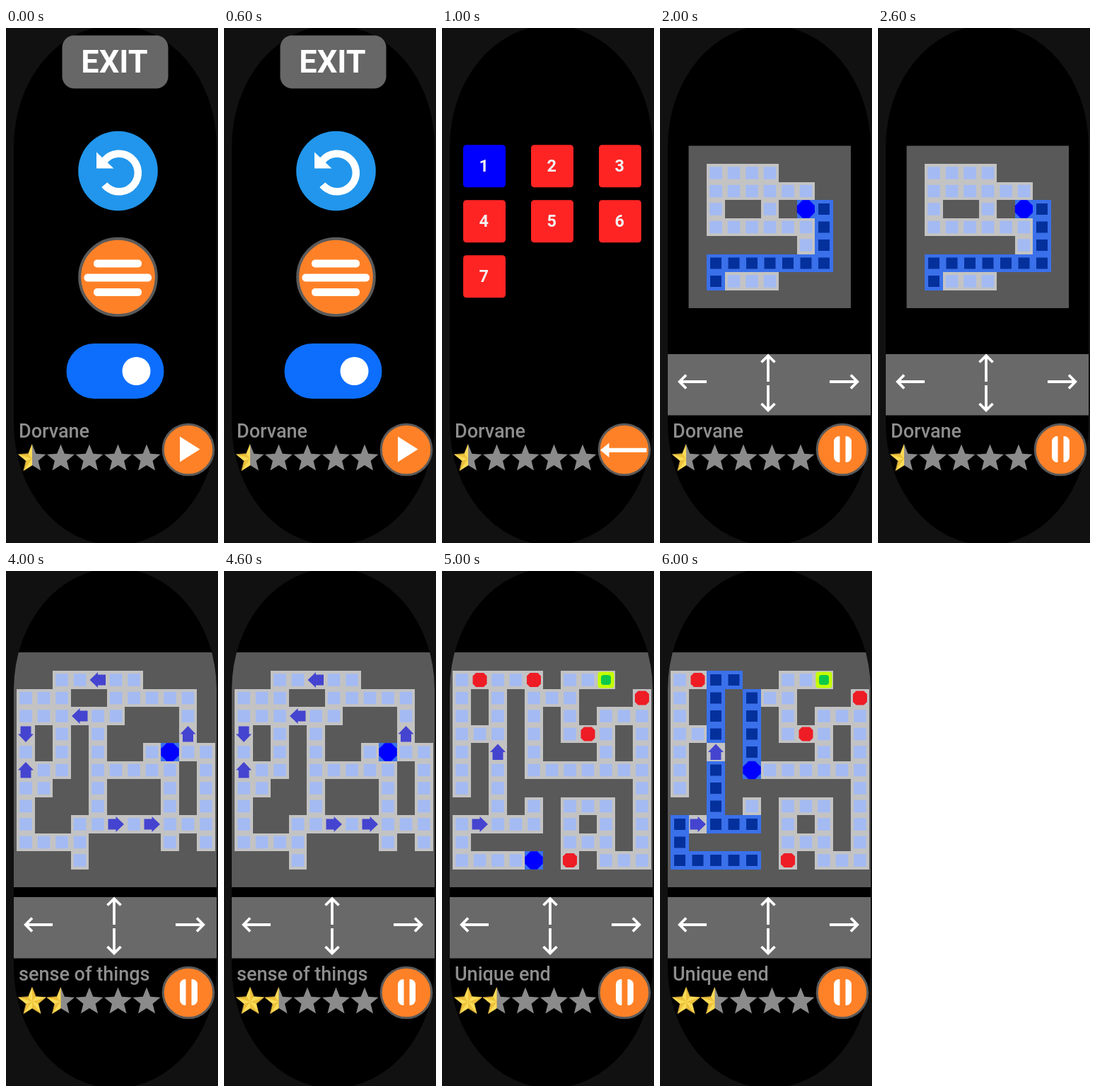
An HTML page with a canvas for the animation above (7 s loop, 300x728 px).

```html
<!DOCTYPE html>
<html lang="en">
<head>
<meta charset="utf-8">
<style>
  html, body { margin: 0; width: 100%; height: 100%; overflow: hidden; background: #111; }
  canvas { display: block; }
</style>
</head>
<body>
<canvas id="stage" width="300" height="728"></canvas>
<script>
const ctx = document.getElementById('stage').getContext('2d');
const PITCH = 25.5, LEFT = 15.25, TOP = 141.25;
const ORANGE = '#ff8127', FONT = 'Roboto, sans-serif';

const oval = new Path2D();
oval.roundRect(11, -4, 287, 735, { x: 143.5, y: 171 });

// o path, t visited, P player, R trap, G goal, <>^v one-way cells
const LOOP = `


..oooo
..oooooo
..o..o.Pt
..oooooot
.......ot
..ttttttt
..tooo`.slice(1);
const RISE = `
..........o
.ooooooo>oo
.oooo..o..o
...oo..oP.o
..oo..ooo.o
..o..ooo..o
.ooooo...oo
..oo....oo^
o....oooo.o
oooooo.oooo
.ooooooo`.slice(1);
const ONE_WAY = `
..oo<oo
ooo..ooooo
ooo<oo...o
v.o.o....^
o.o.o..oPoo
^oo.ooooo.o
oo..o...o.o
o...o...o.o
o..oo>o>ooo
oooo....o.o
...o`.slice(1);
const END_START = `
oRooR.ooG
o.o.ooo...R
o.o.o.o.ooo
ooo.o.oRo.o
o.^.o...o.o
o.o.ooooooo
o.o.......o
..o.o.ooo.o
o>ooo.o.o.o
o.....ooo.o
ooooP.R.ooo`.slice(1);
const END_LATER = `
oRtt..ooG
o.t.too...R
o.t.t.o.ooo
oot.t.oRo.o
o.^.t...o.o
o.t.Poooooo
o.t.......o
..t.o.ooo.o
t>ttt.o.o.o
t.....ooo.o
ttttt.R.ooo`.slice(1);

function poly(color, ...points) {
  ctx.fillStyle = color;
  ctx.beginPath();
  for (const [x, y] of points) ctx.lineTo(x, y);
  ctx.closePath();
  ctx.fill();
}

function box(color, x, y, w, h, radius = 0) {
  ctx.fillStyle = color;
  ctx.beginPath();
  ctx.roundRect(x, y, w, h, radius);
  ctx.fill();
}

function disc(color, x, y, r, border) {
  ctx.fillStyle = color;
  ctx.beginPath();
  ctx.arc(x, y, r, 0, 7);
  ctx.fill();
  if (border) {
    ctx.strokeStyle = '#5a5a5a';
    ctx.lineWidth = border;
    ctx.stroke();
  }
}

function text(str, x, y, size, color, weight = 500, align = 'center') {
  ctx.font = `${weight} ${size}px ${FONT}`;
  ctx.textAlign = align;
  ctx.fillStyle = color;
  ctx.fillText(str, x, y);
}

function placed(x, y, angle, paint) {
  ctx.save();
  ctx.translate(x, y);
  ctx.rotate(angle);
  paint();
  ctx.restore();
}

function octagon(color, x, y, r, cut) {
  const s = r - cut;
  poly(color, [x - s, y - r], [x + s, y - r], [x + r, y - s], [x + r, y + s],
    [x + s, y + r], [x - s, y + r], [x - r, y + s], [x - r, y - s]);
}

function cell(kind, col, row) {
  const x = LEFT + (col + .5) * PITCH, y = TOP + (row + .5) * PITCH;
  const x0 = Math.round(x - PITCH / 2), y0 = Math.round(y - PITCH / 2);
  const x1 = Math.round(x + PITCH / 2), y1 = Math.round(y + PITCH / 2);
  const square = (color, size, r) => box(color, x - size / 2, y - size / 2, size, size, r);
  box('tP'.includes(kind) ? '#3a70ea' : '#c3c3c3', x0, y0, x1 - x0, y1 - y0);
  if (kind === 'o') square('#a3baf3', 17.5);
  else if (kind === 't') square('#04309c', 16);
  else if (kind === 'P') octagon('#0000ff', x, y, 12.7, 8);
  else if (kind === 'R') octagon('#ee1c25', x, y, 10, 4.5);
  else if (kind === 'G') {
    square('#c4ff00', 23, 4);
    square('#0cc94a', 14, 4);
  } else {
    placed(x, y, '>v<^'.indexOf(kind) * Math.PI / 2, () =>
      poly('#4444d0', [-11, -7.5], [0, -7.5], [0, -11], [11.5, 0], [0, 11], [0, 7.5], [-11, 7.5]));
  }
}

function maze(map) {
  map.split('\n').forEach((line, row) =>
    [...line].forEach((kind, col) => kind !== '.' && cell(kind, col, row)));
}

function moveArrow(x, y, angle, length) {
  placed(x, y, angle, () => {
    ctx.strokeStyle = '#fff';
    ctx.lineWidth = 3.8;
    ctx.beginPath();
    ctx.moveTo(-length, 0);
    ctx.lineTo(-3, 0);
    ctx.moveTo(-12, -9.5);
    ctx.lineTo(-2.7, 0);
    ctx.lineTo(-12, 9.5);
    ctx.stroke();
  });
}

function controls() {
  box('#696969', 11, 461, 287, 86.5);
  moveArrow(25, 500, Math.PI, 41);
  moveArrow(282, 500, 0, 42);
  moveArrow(153, 460.5, -Math.PI / 2, 39.5);
  moveArrow(153, 543, Math.PI / 2, 38);
}

function star(x, y, color) {
  const points = Array.from({ length: 10 }, (_, i) => {
    const r = i % 2 ? 9 : 20.5, a = i * Math.PI / 5 - Math.PI / 2;
    return [x + r * Math.cos(a), y + r * Math.sin(a)];
  });
  if (color) return poly(color, ...points);
  poly('#eec23a', ...points);
  ctx.strokeStyle = '#b08c30';
  ctx.lineWidth = 1;
  ctx.stroke();
  points.forEach((p, i) => i % 2 && poly('#fadc58', [x, y], p, points[(i + 1) % 10]));
}

function rating(score) {
  for (let i = 0; i < 5; i++) {
    const x = 37 + 40.5 * i;
    star(x, 609, '#8b8b8b');
    const filled = Math.min(1, score - i);
    if (filled <= 0) continue;
    ctx.save();
    ctx.beginPath();
    ctx.rect(x - 21, 585, 42 * filled, 45);
    ctx.clip();
    star(x, 609);
    ctx.restore();
  }
}

const icons = {
  play() { poly('#fff', [246, 577.5], [246, 613.5], [274.5, 595.5]); },
  back() {
    box('#fff', 233, 593.7, 56.5, 6);
    poly('#fff', [224, 596.7], [236.5, 586.5], [236.5, 607]);
  },
  pause() {
    box('#fff', 246, 577, 8.5, 37, [8, 1, 1, 8]);
    box('#fff', 262.5, 577, 8.5, 37, [1, 8, 8, 1]);
  }
};

function menu() {
  box('#676767', 79.5, 10.5, 150, 75, 17);
  text('EXIT', 153.5, 62.5, 45, '#fff', 700);

  disc('#2196ec', 158.5, 202, 56.3);
  ctx.strokeStyle = '#fff';
  ctx.lineWidth = 10.5;
  ctx.beginPath();
  ctx.arc(160, 204.5, 26.8, Math.PI * 1.22, Math.PI * 2.78);
  ctx.stroke();
  poly('#fff', [128, 175.5], [128, 198.5], [152.5, 198.5]);

  disc(ORANGE, 158.5, 352, 54.3, 4);
  box('#fff', 124, 327.5, 68, 11, 5);
  box('#fff', 110.5, 347.5, 95.5, 11, 5);
  box('#fff', 124, 368, 68, 11, 5);

  box('#0d6efd', 85.5, 446, 138, 78, 39);
  disc('#fff', 184.5, 485, 20);
}

function levels() {
  for (let i = 0; i < 7; i++) {
    const x = 30 + 96 * (i % 3), y = 165.3 + 78 * Math.floor(i / 3);
    box(i ? '#ff2424' : '#0000ff', x, y, 60, 60, 4.5);
    text(i + 1, x + 29.3, y + 37.3, 23.5, '#f2f2f2', 700);
  }
}

function play(map, wide = true) {
  ctx.save();
  ctx.clip(oval);
  if (wide) box('#595959', 11, 115, 287, 332);
  else box('#595959', 40.5, 166.5, 229.5, 229.5);
  maze(map);
  controls();
  ctx.restore();
}

const scenes = [
  ['Dorvane', .5, 'play', menu],
  ['Dorvane', .5, 'back', levels],
  ['Dorvane', .5, 'pause', () => play(LOOP, false)],
  ['Increasing', 1, 'pause', () => play(RISE)],
  ['sense of things', 1.5, 'pause', () => play(ONE_WAY)],
  ['Unique end', 1.5, 'pause', () => play(END_START)],
  ['Unique end', 1.5, 'pause', () => play(END_LATER)]
];

function render(now) {
  const [title, score, icon, content] = scenes[Math.floor(now / 1000) % scenes.length];
  box('#111', 0, 0, 300, 728);
  ctx.fillStyle = '#000';
  ctx.fill(oval);
  content();
  text(title, 18, 579, 27, '#8e8e8e', 500, 'left');
  rating(score);
  disc(ORANGE, 258, 596, 35.8, 3);
  icons[icon]();
}

const start = performance.now();
(function tick() {
  render(performance.now() - start);
  requestAnimationFrame(tick);
})();
</script>
</body>
</html>
```
